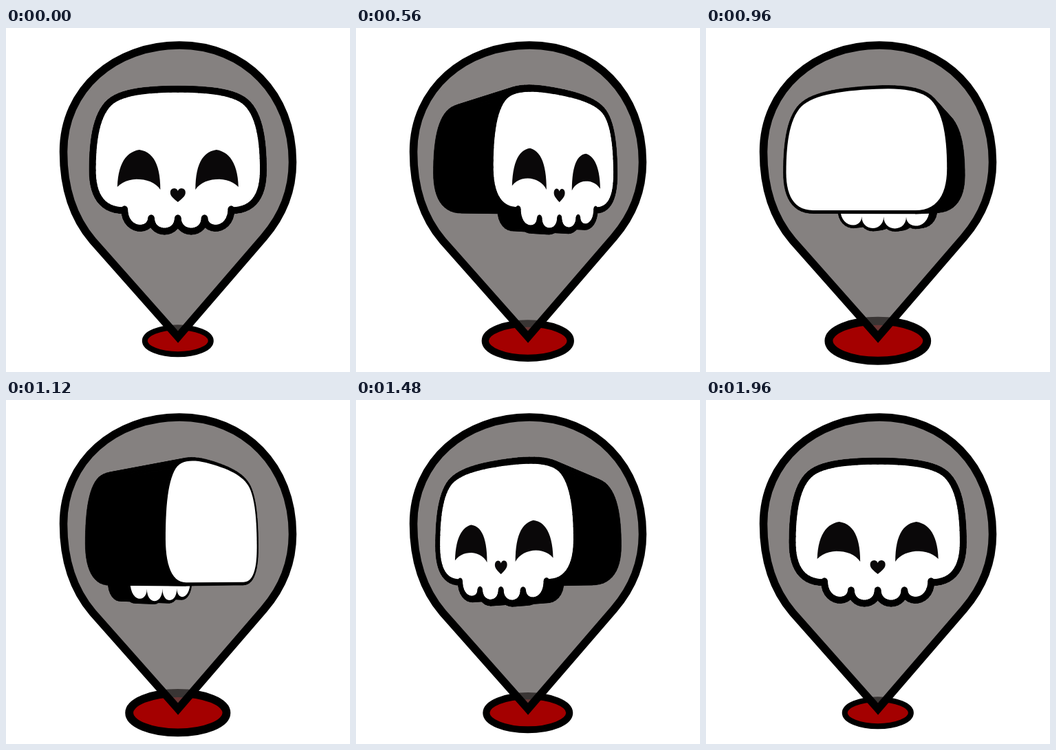
Write an HTML page with a canvas that moves like this. It is 500 px wide and 500 px high and loops after 2000 ms.

```html
<!DOCTYPE html>
<html lang="en">
<head>
<meta charset="utf-8">
<title>Skull pin</title>
<style>
  html, body { margin: 0; width: 100%; height: 100%; overflow: hidden; background: #fff; }
  svg, canvas { position: absolute; left: 0; top: 0; width: 500px; height: 500px; }
</style>
</head>
<body>
<svg viewBox="0 0 500 500">
  <ellipse id="spot" rx="48" ry="19.5" fill="#a40000" stroke="#000" stroke-width="8"/>
  <path d="M250 449 L126 309 C97 275 83.5 232 83.5 180 C83.5 88 159 25 252 25 C347 25 416.5 96 416.5 195 C416.5 240 399 276 375 304 Z"
        fill="rgba(82,76,75,.7)" stroke="#000" stroke-width="11.5" stroke-miterlimit="10"/>
</svg>
<canvas id="view"></canvas>
<script>
const LOOP = 2000;
const CAMERA = 720, HALF = 68, JAW_BACK = 29;
const CX = 249.8, HORIZON = 262;
const FRONT_SCALE = CAMERA / (CAMERA - HALF);
const LINE = 4.75 / FRONT_SCALE;
const INK = '#000', PAPER = '#fff', EYE = '#0a0809';

const spot = document.getElementById('spot');
const view = document.getElementById('view');
const ctx = view.getContext('2d');
const ratio = window.devicePixelRatio || 1;
view.width = view.height = 500 * ratio;

// Samples chained cubics; x runs from the middle of the face, y down the stage.
function curve(nums, steps = 14) {
  const pts = [];
  const add = (x, y) => pts.push([x / FRONT_SCALE, (y - HORIZON) / FRONT_SCALE]);
  add(nums[0], nums[1]);
  for (let i = 0; i + 7 < nums.length; i += 6) {
    for (let k = 1; k <= steps; k++) {
      const t = k / steps, s = 1 - t;
      const mix = j => s * s * s * nums[j] + 3 * s * s * t * nums[j + 2] +
        3 * s * t * t * nums[j + 4] + t * t * t * nums[j + 6];
      add(mix(i), mix(i + 1));
    }
  }
  return pts;
}

const flip = pts => pts.map(([x, y]) => [-x, y]);
const mirror = half => [...flip(half).reverse(), ...half.slice(1)];

// Four teeth as U curves hanging between evenly spaced notches.
function teeth() {
  const width = 38.75, nums = [-2 * width, 263];
  for (let i = -2; i < 2; i++) {
    const outer = i === -2 || i === 1;
    const low = outer ? 297.5 : 302;
    nums.push(i * width, low, (i + 1) * width, low, (i + 1) * width, i === 1 ? 263 : 276);
  }
  return curve(nums);
}

// Pushes a closed outline outwards by the line's half width.
function grow(pts, side) {
  const n = pts.length;
  return pts.map(([x, y], i) => {
    const a = pts[(i + n - 1) % n], b = pts[(i + 1) % n];
    const dx = b[0] - a[0], dy = b[1] - a[1], len = Math.hypot(dx, dy) || 1;
    return [x + side * LINE * dy / len, y - side * LINE * dx / len];
  });
}

const head = mirror(curve([0, 89, 50, 89, 87, 94, 102, 111, 119, 130, 124, 165, 124, 207, 124, 242, 111, 265, 79, 265]));
const jaw = teeth();
const headRim = grow(head, 1), jawRim = grow(jaw, -1);
const rightEye = curve([25.5, 235, 25.5, 200, 35, 180, 56, 177, 75, 180, 87, 197, 88, 231, 72, 214, 37, 217, 25.5, 235]);
const leftEye = flip(rightEye);
const nose = mirror(curve([0, 237, 2, 231, 11, 232, 11, 239, 11, 243, 9, 246, 0, 253]));

let sin = 0, cos = 1;

function project([x, y], z) {
  const scale = CAMERA / (CAMERA - (z * cos - x * sin));
  return [CX + (x * cos + z * sin) * scale, HORIZON + y * scale];
}

function polygon(points, color, seam) {
  ctx.beginPath();
  points.forEach(p => ctx.lineTo(p[0], p[1]));
  ctx.closePath();
  ctx.fillStyle = color;
  ctx.fill();
  if (seam) {
    ctx.strokeStyle = color;
    ctx.lineWidth = 0.5;
    ctx.stroke();
  }
}

const flat = (pts, z, color) => polygon(pts.map(p => project(p, z)), color);

function extrude(rim, back, front) {
  flat(rim, back, INK);
  flat(rim, front, INK);
  rim.forEach((p, i) => {
    const q = rim[(i + 1) % rim.length];
    polygon([project(p, back), project(q, back), project(q, front), project(p, front)], INK, true);
  });
}

// A round-ended line lying in a plane of the model.
function ribbon(pts, z) {
  pts.forEach(([x, y], i) => {
    const dot = Array.from({ length: 12 }, (_, k) => {
      const a = k * Math.PI / 6;
      return [x + LINE * Math.cos(a), y + LINE * Math.sin(a)];
    });
    flat(dot, z, INK);
    if (!i) return;
    const [px, py] = pts[i - 1];
    const len = Math.hypot(x - px, y - py) || 1;
    const nx = LINE * (y - py) / len, ny = -LINE * (x - px) / len;
    flat([[px + nx, py + ny], [x + nx, y + ny], [x - nx, y - ny], [px - nx, py - ny]], z, INK);
  });
}

function drawSkull() {
  const facing = CAMERA * cos;
  extrude(jawRim, JAW_BACK, HALF);
  if (facing < JAW_BACK) flat(jaw, JAW_BACK, PAPER);
  extrude(headRim, -HALF, HALF);
  if (facing < -HALF) flat(head, -HALF, PAPER);
  if (facing > HALF) {
    flat(head, HALF, PAPER);
    ribbon(head, HALF);
    flat(jaw, HALF, PAPER);
    ribbon(jaw, HALF);
    [leftEye, rightEye, nose].forEach(shape => flat(shape, HALF, EYE));
  }
}

// Symmetric cubic-bezier(.6, 0, .4, 1).
function ease(x) {
  let lo = 0, hi = 1;
  for (let i = 0; i < 30; i++) {
    const t = (lo + hi) / 2, s = 1 - t;
    if (1.8 * t * s * s + 1.2 * t * t * s + t * t * t < x) lo = t; else hi = t;
  }
  return lo * lo * (3 - 2 * lo);
}

const start = performance.now();

function frame() {
  const u = (performance.now() - start) % LOOP / LOOP;
  const angle = 2 * Math.PI * ease(u);
  sin = Math.sin(angle);
  cos = Math.cos(angle);
  const pulse = 1 + 0.49 * Math.sin(Math.PI * u) ** 2;
  spot.setAttribute('transform', `translate(249.8 454.7) scale(${pulse})`);
  ctx.setTransform(ratio, 0, 0, ratio, 0, 0);
  ctx.clearRect(0, 0, 500, 500);
  drawSkull();
  requestAnimationFrame(frame);
}
frame();
</script>
</body>
</html>
```
